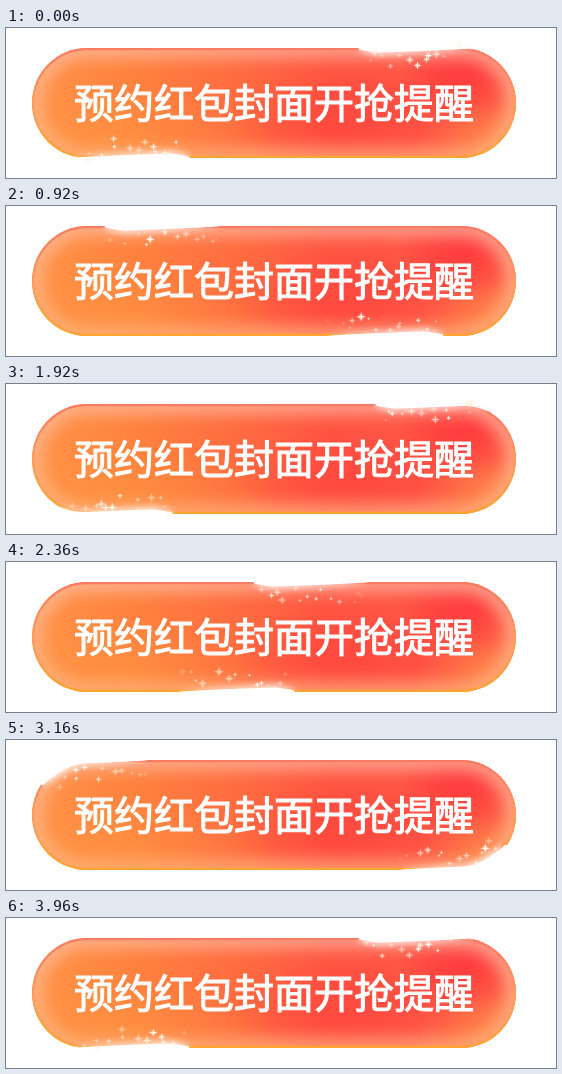
An HTML page that plays this animation: 550 by 150 pixels, repeating every 4000 ms.

```html
<!DOCTYPE html>
<html lang="zh-CN">
<head>
<meta charset="utf-8">
<style>
html, body { margin: 0; width: 100%; height: 100%; overflow: hidden; background: #fff; }
svg { display: block; width: 550px; height: 150px; }
text {
  font: 500 40px "Noto Sans CJK SC", "Noto Sans CJK", sans-serif;
  fill: #fff; stroke: #fff; stroke-width: 1.1px; text-anchor: middle;
}
</style>
</head>
<body>
<svg viewBox="0 0 550 150">
  <defs>
    <linearGradient id="base">
      <stop offset="0" stop-color="#ff9348"/>
      <stop offset=".2" stop-color="#ff833e"/>
      <stop offset=".42" stop-color="#ff6c40"/>
      <stop offset=".62" stop-color="#ff5542"/>
      <stop offset=".85" stop-color="#ff5646"/>
      <stop offset="1" stop-color="#ff7a4e"/>
    </linearGradient>
    <linearGradient id="edge" x2="0" y2="1">
      <stop offset="0" stop-color="#f77a62"/>
      <stop offset=".5" stop-color="#ff9a5c"/>
      <stop offset="1" stop-color="#ffa42e"/>
    </linearGradient>
    <linearGradient id="rim" x2="0" y2="1">
      <stop offset="0" stop-color="#ffc2ae"/>
      <stop offset="1" stop-color="#ffb884"/>
    </linearGradient>
    <radialGradient id="red">
      <stop offset="0" stop-color="#ff363b"/>
      <stop offset=".35" stop-color="#ff363b" stop-opacity=".75"/>
      <stop offset="1" stop-color="#ff363b" stop-opacity="0"/>
    </radialGradient>
    <radialGradient id="orange">
      <stop offset="0" stop-color="#ff9a42"/>
      <stop offset="1" stop-color="#ff9a42" stop-opacity="0"/>
    </radialGradient>
    <clipPath id="clip"><rect x="26" y="20" width="484" height="110" rx="55"/></clipPath>
    <filter id="soft" x="-20%" y="-50%" width="140%" height="200%"><feGaussianBlur stdDeviation="8"/></filter>
    <filter id="glow" filterUnits="userSpaceOnUse" width="550" height="150"><feGaussianBlur stdDeviation="3"/></filter>
  </defs>
  <g clip-path="url(#clip)">
    <rect x="26" y="20" width="484" height="110" fill="url(#base)"/>
    <ellipse cx="120" cy="115" rx="150" ry="60" fill="url(#orange)" opacity=".5"/>
    <ellipse cx="335" cy="92" rx="110" ry="50" fill="url(#red)" opacity=".4"/>
    <ellipse cx="464" cy="46" rx="72" ry="52" fill="url(#red)" opacity=".85"/>
    <ellipse cx="485" cy="125" rx="80" ry="50" fill="url(#orange)" opacity=".6"/>
    <rect x="26" y="20" width="484" height="110" rx="55" fill="none" stroke="url(#rim)" stroke-width="20" opacity=".7" filter="url(#soft)"/>
    <rect x="27" y="21" width="482" height="108" rx="54" fill="none" stroke="url(#edge)" stroke-width="2.4"/>
  </g>
  <path id="halo" fill="#fff" opacity=".7" filter="url(#glow)" clip-path="url(#clip)"/>
  <path id="streak" fill="#fff"/>
  <g id="sparks" fill="#fffaf0"></g>
  <text x="268" y="90">预约红包封面开抢提醒</text>
</svg>
<script>
const STEP = 40, FRAMES = 100, LAP_FRAMES = 99, LIFE = 14;
const R = 55, CX = 268, CY = 75, HALF = 187;
const RIGHT = CX + HALF, LAP = 4 * HALF + 2 * Math.PI * R;
const START = 353, TAIL = 115, DRIFT = 2.8;
const $ = id => document.getElementById(id);
const mod = (a, n) => ((a % n) + n) % n;

function rand(seed) {
  const v = Math.sin(seed * 127.1 + 31.7) * 43758.5453;
  return v - Math.floor(v);
}

// Point on the outline, anticlockwise from the top edge, d inwards and t along the tangent.
function at(s, d, t = 0) {
  s = mod(s + RIGHT - START, LAP);
  const flip = s >= LAP / 2 ? -1 : 1;
  s = mod(s, LAP / 2);
  const a = Math.max(0, s - 2 * HALF) / R, r = R - d;
  const x = HALF - Math.min(s, 2 * HALF) - r * Math.sin(a) - t * Math.cos(a);
  const y = -r * Math.cos(a) + t * Math.sin(a);
  return [CX + flip * x, CY + flip * y];
}

const headAt = (frame, side) => frame / LAP_FRAMES * LAP + side * LAP / 2;
const join = pts => "M" + pts.map(p => p.map(v => v.toFixed(2)).join(" ")).join("L") + "Z";

function ribbon(head, depth) {
  const inner = [], outer = [], n = 36;
  for (let i = 0; i <= n; i++) {
    const u = i / n, s = head - u * TAIL;
    const w = Math.min(1, .35 + u * 4) * Math.pow(1 - u, .7);
    inner.push(at(s, depth * w));
    outer.unshift(at(s, -2 * w));
  }
  return join(inner.concat(outer));
}

function star(x, y, r) {
  const pts = [];
  for (let i = 0; i < 8; i++) {
    const a = i * Math.PI / 4, l = i % 2 ? r * .25 : r;
    pts.push([x + l * Math.cos(a), y + l * Math.sin(a)]);
  }
  return `<path d="${join(pts)}"/>`;
}

// Sparks keep flying along the tangent on which the head released them.
function spark(frame, age, side) {
  const seed = mod(frame - age, FRAMES) * 7 + side * 1009;
  const s = headAt(frame - age, side) - rand(seed + 1) * 12;
  const d = 2 + 16 * rand(seed + 2) + age * .35;
  const [x, y] = at(s, d, age * DRIFT);
  const fade = Math.min(1, (age + 1) / 2, (LIFE - age) / 5);
  const twinkle = .75 + .25 * Math.sin(age * 1.5 + seed);
  const size = 1.6 + 3.6 * rand(seed + 3);
  return `<g opacity="${(fade * twinkle).toFixed(2)}">` +
    `<circle cx="${x.toFixed(2)}" cy="${y.toFixed(2)}" r="${(size * .6).toFixed(2)}" fill="#ffd0aa" opacity=".5"/>` +
    star(x, y, size) + "</g>";
}

function draw(frame) {
  let streak = "", halo = "", sparks = "";
  for (const side of [0, 1]) {
    const head = headAt(frame, side);
    streak += ribbon(head, 5.2);
    halo += ribbon(head, 9);
    for (let age = 0; age < LIFE; age++) sparks += spark(frame, age, side);
  }
  $("streak").setAttribute("d", streak);
  $("halo").setAttribute("d", halo);
  $("sparks").innerHTML = sparks;
}

const begin = performance.now();
let last = -1;
function tick() {
  const frame = Math.floor(Math.max(0, performance.now() - begin) / STEP) % FRAMES;
  if (frame !== last) draw(last = frame);
  requestAnimationFrame(tick);
}
tick();
</script>
</body>
</html>
```
